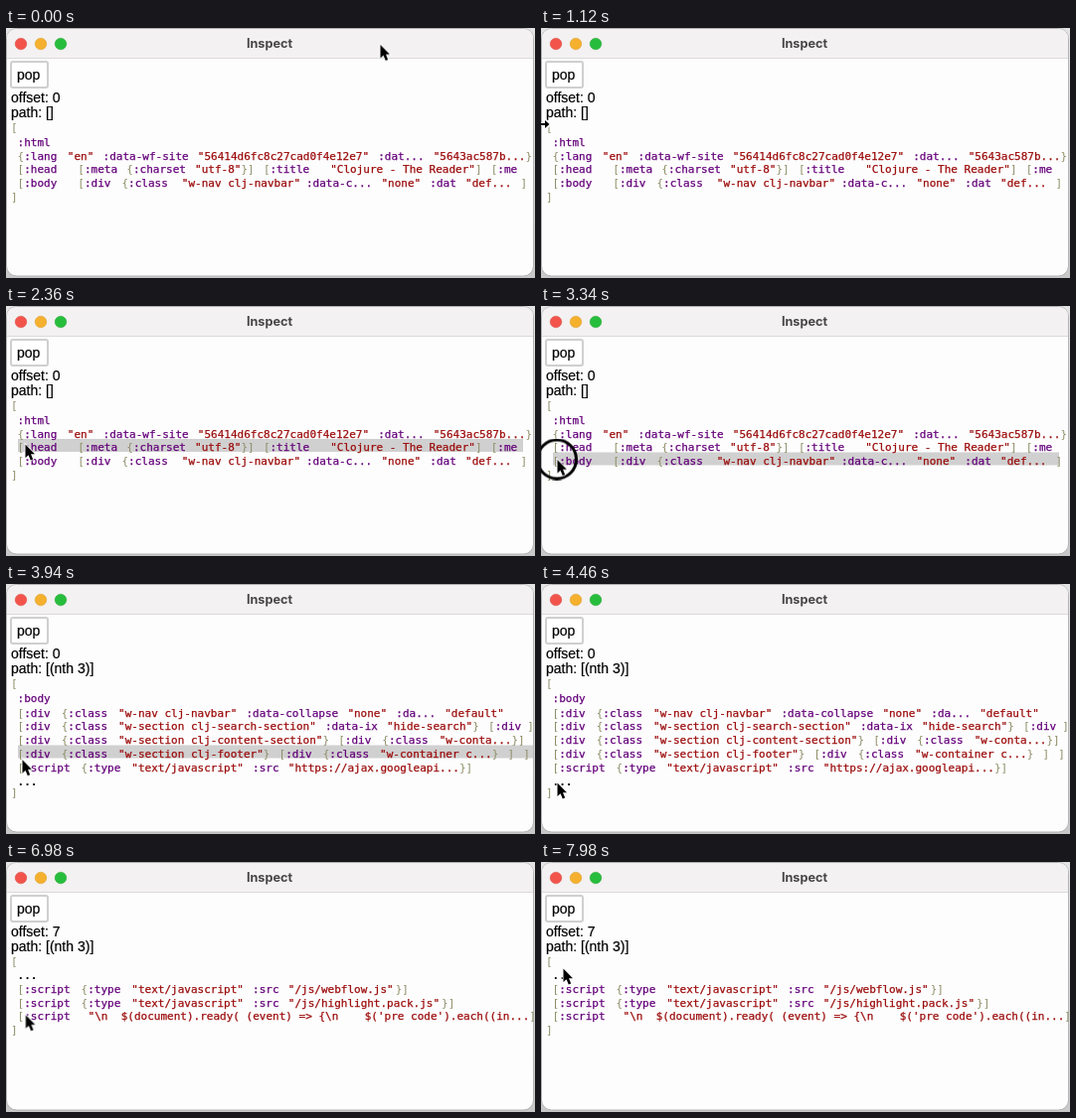
An HTML page that plays this animation: 532x252 px, repeating every 8000 ms.

```html
<!DOCTYPE html>
<html lang="en">
<head>
<meta charset="utf-8">
<title>Inspect</title>
<style>
html, body { margin: 0; width: 100%; height: 100%; overflow: hidden; background: linear-gradient(#e4e4e4, #c8c8c8); }
svg { display: block; }
text { white-space: pre; font: 14px "Liberation Sans", Arial, sans-serif; fill: #000; stroke: #000; stroke-width: .2; }
.title { font: 700 12.7px Inter, sans-serif; fill: #474545; stroke: none; text-anchor: middle; }
.code text { font: 11px "DejaVu Sans Mono", monospace; fill: #8c8c66; stroke: none; }
.code tspan { stroke-width: .25; }
.code .key { fill: #64007a; stroke: #64007a; }
.code .str { fill: #9c0c0c; stroke: #9c0c0c; }
.code .more { font-weight: bold; fill: #000; }

#top, #body, #rest, #hover, #ring, #arrow, #resize { animation: 8s step-end infinite; }
#top { animation-name: top; }
#body { animation-name: body; }
#rest { animation-name: rest; }
#hover { fill: #d0d0d0; height: 13px; animation-name: hover; }
#ring { fill: none; stroke: #000; stroke-width: 3; animation-name: ring; }
#arrow { animation-name: arrow; }
#resize { animation-name: resize; }
#pointer { animation: move 8s linear infinite; }

@keyframes top {
  0% { visibility: visible; }
  43.25%, 100% { visibility: hidden; }
}
@keyframes body {
  0% { visibility: hidden; }
  43.25% { visibility: visible; }
  69.25%, 100% { visibility: hidden; }
}
@keyframes rest {
  0% { visibility: hidden; }
  69.25%, 100% { visibility: visible; }
}
@keyframes ring {
  0% { visibility: hidden; }
  40.75% { visibility: visible; }
  43.25% { visibility: hidden; }
  67.25% { visibility: visible; }
  69.5%, 100% { visibility: hidden; }
}
@keyframes arrow {
  0% { visibility: visible; }
  10.25% { visibility: hidden; }
  14.25%, 100% { visibility: visible; }
}
@keyframes resize {
  0% { visibility: hidden; transform: translateY(90px); }
  10.5% { visibility: visible; transform: translateY(90px); }
  13.95% { visibility: visible; transform: translateY(97px); }
  14.25%, 100% { visibility: hidden; transform: translateY(97px); }
}
@keyframes hover {
  0% { x: 12px; y: 120px; width: 0; }
  3.9% { x: 259px; y: 134px; width: 220px; }
  5% { x: 12px; y: 120px; width: 0; }
  16.75% { x: 12px; y: 120px; width: 516px; }
  18.25% { x: 12px; y: 134px; width: 508px; }
  19.5% { x: 12px; y: 147.5px; width: 509px; }
  21.5% { x: 12px; y: 134px; width: 508px; }
  31.75% { x: 12px; y: 147.5px; width: 509px; }
  43.25% { x: 12px; y: 148.5px; width: 518px; }
  47% { x: 12px; y: 162.5px; width: 518px; }
  49.75% { x: 12px; y: 176.5px; width: 458px; }
  52.5%, 100% { x: 12px; y: 176.5px; width: 0; }
}
@keyframes move {
  0% { transform: translate(376px, 16px); }
  2.5% { transform: translate(366px, 90px); }
  4.4% { transform: translate(320px, 140px); }
  6.25% { transform: translate(190px, 142px); }
  8.1% { transform: translate(80px, 120px); }
  10.25%, 14% { transform: translate(0, 94px); }
  17.5% { transform: translate(16px, 126px); }
  20%, 21% { transform: translate(20px, 151px); }
  23%, 29.5% { transform: translate(19px, 139px); }
  33.5% { transform: translate(17px, 153px); }
  41%, 45.25% { transform: translate(16px, 154.5px); }
  53.5%, 71.5% { transform: translate(16px, 200px); }
  73.5% { transform: translate(17px, 195px); }
  76.75%, 84% { transform: translate(19px, 161px); }
  93%, 94.25% { transform: translate(20px, 141px); }
  99.75%, 100% { transform: translate(22px, 107px); }
}
</style>
</head>
<body>
<svg width="532" height="252" viewBox="0 0 532 252">
  <defs>
    <clipPath id="pane"><rect x="1" y="31" width="530" height="219"/></clipPath>
  </defs>
  <rect x=".5" y=".5" width="530" height="249.5" rx="10" fill="#fdfdfd" stroke="#b4b4b4"/>
  <path d="M1 30V11Q1 1 11 1H520Q530 1 530 11V30Z" fill="#f3f1f1"/>
  <path d="M1 30.5H530" stroke="#dcdada"/>
  <circle cx="15" cy="16" r="5.8" fill="#f2544c" stroke="#d9453e" stroke-width=".5"/>
  <circle cx="35" cy="16" r="5.8" fill="#f5b02e" stroke="#d99a25" stroke-width=".5"/>
  <circle cx="55" cy="16" r="5.8" fill="#27bd3c" stroke="#1fa331" stroke-width=".5"/>
  <text class="title" x="265" y="20">Inspect</text>
  <rect x="5" y="34" width="37" height="26" rx="2" fill="#fff" stroke="#cfcfcf" stroke-width="2"/>
  <text x="11" y="52">pop</text>

  <g clip-path="url(#pane)">
    <rect id="hover"/>
    <g id="top"></g>
    <g id="body"></g>
    <g id="rest"></g>
  </g>

  <g id="resize">
    <path d="M0 0H5M4 -4.5L9 0L4 4.5Z" fill="#000" stroke="#fff" stroke-width="3"/>
    <path d="M0 0H5" stroke="#000" stroke-width="2"/>
    <path d="M4 -4L8.5 0L4 4Z"/>
  </g>
  <g id="pointer">
    <circle id="ring" r="19.5"/>
    <path id="arrow" d="M.5 .5V14L3.6 11.2L5.8 16.4L8.2 15.4L6 10.3H10Z" stroke="#fff" stroke-width="1.6" paint-order="stroke"/>
  </g>
</svg>
<script>
const CHAR = 11 * 0.602;
const GAP = 9.2;
const TOKEN = /"[^"]*"|".*?(?=[}\]]*$)|:[\w.-]+/g;

const paint = run => run.replace(TOKEN, s =>
  `<tspan class="${s[0] === '"' ? 'str' : 'key'}">${s}</tspan>`);

// "|" is the usual gap between runs, "|n|" a gap of n pixels.
function line(y, source, x = 5 + CHAR) {
  if (source === '...') return `<text class="more" x="${x}" y="${y}">...</text>`;
  return source.split(/\|(?:([\d.]+)\|)?/).map((part, i) => {
    if (i % 2) {
      x += Number(part || GAP);
      return '';
    }
    const text = `<text x="${x}" y="${y}">${paint(part)}</text>`;
    x += part.length * CHAR;
    return text;
  }).join('');
}

function view(id, offset, path, end, rows) {
  document.getElementById(id).innerHTML =
    `<text x="5" y="75">offset: ${offset}</text><text x="5" y="90">path: ${path}</text>` +
    `<g class="code">${line(103.5, '[', 5)}` +
    rows.map(([y, source]) => line(y, source)).join('') +
    `${line(end, ']', 5)}</g>`;
}

const raw = String.raw;

view('top', 0, '[]', 173.5, [
  [118.5, ':html'],
  [132.5, '{:lang|10.5|"en"|:data-wf-site|"56414d6fc8c27cad0f4e12e7"|:dat...|"5643ac587b...}'],
  [146, '[:head|21|[:meta|{:charset|"utf-8"}]|[:title|21|"Clojure - The Reader"]|[:me'],
  [159.5, '[:body|21|[:div|11|{:class|14|"w-nav clj-navbar"|6|:data-c...|"none"|:dat|"def...|]']
]);

view('body', 0, '[(nth 3)]', 214, [
  [118.5, ':body'],
  [133.5, '[:div|11|{:class|11|"w-nav clj-navbar"|:data-collapse|"none"|:da...|"default"'],
  [147, '[:div|11|{:class|11|"w-section clj-search-section"|:data-ix|"hide-search"}|[:div|6|]'],
  [160.5, '[:div|11|{:class|11|"w-section clj-content-section"}|[:div|11|{:class|11|"w-conta...}]'],
  [174.5, '[:div|11|{:class|11|"w-section clj-footer"}|[:div|11|{:class|11|"w-container c...}|]|]'],
  [188.5, '[:script|11|{:type|11|"text/javascript"|:src|"https://ajax.googleapi...}]'],
  [203, '...']
]);

view('rest', 7, '[(nth 3)]', 173, [
  [118, '...'],
  [132, '[:script|11|{:type|11|"text/javascript"|:src|"/js/webflow.js"|2|}]'],
  [145.5, '[:script|11|{:type|11|"text/javascript"|:src|"/js/highlight.pack.js"|2|}]'],
  [159, raw`[:script|18|"\n  $(document).ready( (event) => {\n    $('pre code').each((in...]`]
]);
</script>
</body>
</html>
```
